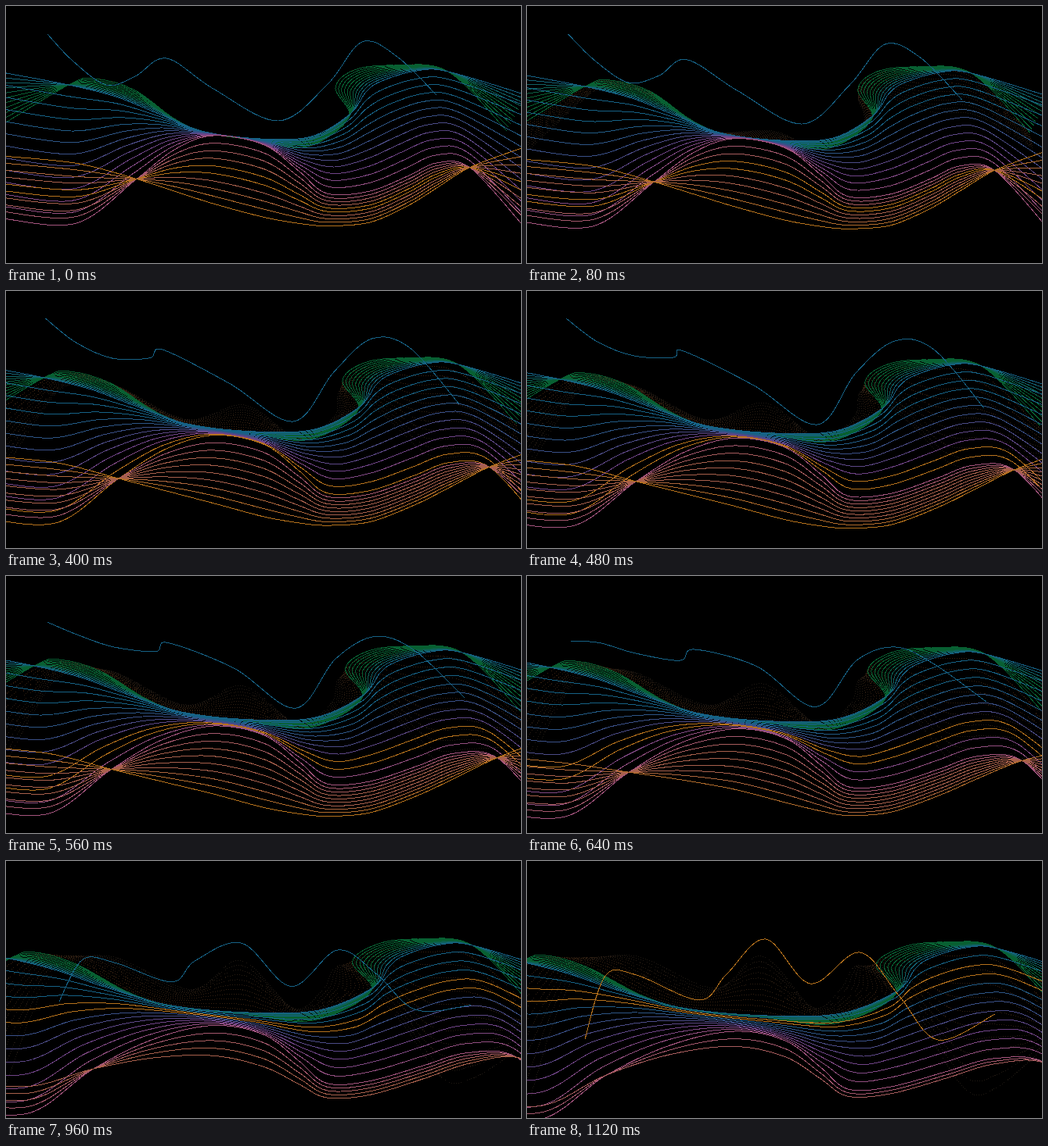
An HTML page that plays this animation: 658x329 px, repeating every 1200 ms.

```html
<!DOCTYPE html>
<html lang="en">
<head>
<meta charset="utf-8">
<title>Flowing lines</title>
<style>
html, body { margin: 0; width: 100%; height: 100%; overflow: hidden; background: #000; }
svg { display: block; width: 658px; height: 329px; }
path { fill: none; stroke-width: 1; shape-rendering: crispEdges; }
</style>
</head>
<body>
<svg id="stage" viewBox="0 0 658 329"></svg>
<script>
const stage = document.getElementById('stage');
const STEP = 80, STEPS = 15;

const BROWN = [58, 34, 16], GREEN = [8, 96, 50], BLUE = [22, 98, 134], INDIGO = [58, 80, 136],
      PURPLE = [112, 68, 136], PINK = [164, 84, 126], SALMON = [168, 96, 76], ORANGE = [182, 114, 28];

const points = text => text.split(' ').map(p => p.split(',').map(Number));
const mix = (a, b, k) => a.map((v, i) => v + (b[i] - v) * k);
const mixCurve = (a, b, k) => a.map((p, i) => mix(p, b[i], k));
const clamp = (v, low, high) => Math.max(low, Math.min(high, v));

// Guide curves; every sheaf is a blend between two neighbours
const veil = points('5,300 40,190 75,135 140,122 240,163 300,122 365,187 400,165 428,135 500,205 560,292 600,290 660,240');
const green = points('-5,152 80,101 112,93 165,108 235,156 320,172 385,180 438,143 421,105 445,82 495,76 565,84 640,160');
const blue = points('-5,85 80,101 140,116 190,136 250,160 325,170 390,167 440,138 460,110 480,96 525,83 565,84 665,114');
const pink = points('-5,272 90,278 165,223 215,184 265,166 330,178 375,212 410,240 465,237 515,217 550,201 593,207 658,278');
const orange = pink.map(([x]) => [x, x < 430
  ? 237 - 45 * Math.cos(Math.PI * x / 430)
  : 231.5 + 50.5 * Math.cos(Math.PI * (x - 430) / 245)]);

const crest = [
  '53,36 85,70 128,101 165,90 205,67 265,106 348,147 411,100 455,46 500,65 550,114',
  '50,35 90,65 137,83 187,85 200,77 290,121 371,171 420,105 470,64 520,75 584,150',
  '74,228 100,147 140,146 220,178 255,145 305,100 362,157 425,117 475,172 525,229 598,196'
].map(points);

// The sides spread away from the middle while the whole curve sinks
const upperDrift = ([x, y], k) => [x + k * clamp(0.45 * (x - 365), -88, 36), y + k * 28];
const lowerDrift = ([x, y], k) => [x + k * clamp(0.65 * (x - clamp(x, 265, 480)), -70, 70), y + k * 52];

function ramp(colors, k) {
  const at = Math.min(k, 0.999) * (colors.length - 1), i = Math.floor(at);
  return mix(colors[i], colors[i + 1], at - i);
}

// Smooth curve through all points
function line(p, color, dash = 'none') {
  const last = p.length - 1;
  let d = `M${p[0]}`;
  for (let i = 0; i < last; i++) {
    const before = p[Math.max(i - 1, 0)], after = p[Math.min(i + 2, last)];
    const from = p[i], to = p[i + 1];
    const c1 = from.map((v, n) => v + (to[n] - before[n]) / 6);
    const c2 = to.map((v, n) => v - (after[n] - from[n]) / 6);
    d += `C${c1} ${c2} ${to}`;
  }
  return `<path d="${d}" stroke="rgb(${color.map(Math.round)})" stroke-dasharray="${dash}"/>`;
}

function sheaf(a, b, count, shown, color, dash) {
  return Array.from({ length: shown }, (_, i) => line(mixCurve(a, b, i / count), color(i), dash)).join('');
}

function draw(step) {
  const k = step / (STEPS - 1);
  const [g, b] = [green, blue].map(c => c.map(p => upperDrift(p, k)));
  const [p, o] = [pink, orange].map(c => c.map(q => lowerDrift(q, k)));
  const v = mixCurve(g, veil, Math.sqrt(k));

  // An orange band climbs by one line per step
  const accent = (i, base) => i + step === 16 || i + step === 17 ? ORANGE : base;

  const top = step < 6 ? mixCurve(crest[0], crest[1], step / 6)
                       : mixCurve(crest[1], crest[2], (step - 6) / 8);

  stage.innerHTML =
    sheaf(v, g, 11, 11, i => mix([30, 24, 18], BROWN, i / 10), '1 2') +
    sheaf(g, b, 10, 10, i => ramp([GREEN, GREEN, BLUE], i / 10)) +
    sheaf(b, p, 12, 12, i => accent(i, ramp([BLUE, BLUE, INDIGO, PURPLE, PINK], i / 12))) +
    sheaf(p, o, 9, Math.min(10, 17 - step), i => accent(i + 12, ramp([PINK, SALMON, SALMON, ORANGE], i / 9))) +
    line(top, step > 12 ? ORANGE : BLUE);
}

const start = performance.now();
let shown = -1;
function tick() {
  let step = Math.floor((performance.now() - start) / STEP) % STEPS;
  if (step === 2) step = 1; // the motion rests here for one beat
  if (step !== shown) draw(shown = step);
  requestAnimationFrame(tick);
}
tick();
</script>
</body>
</html>
```
